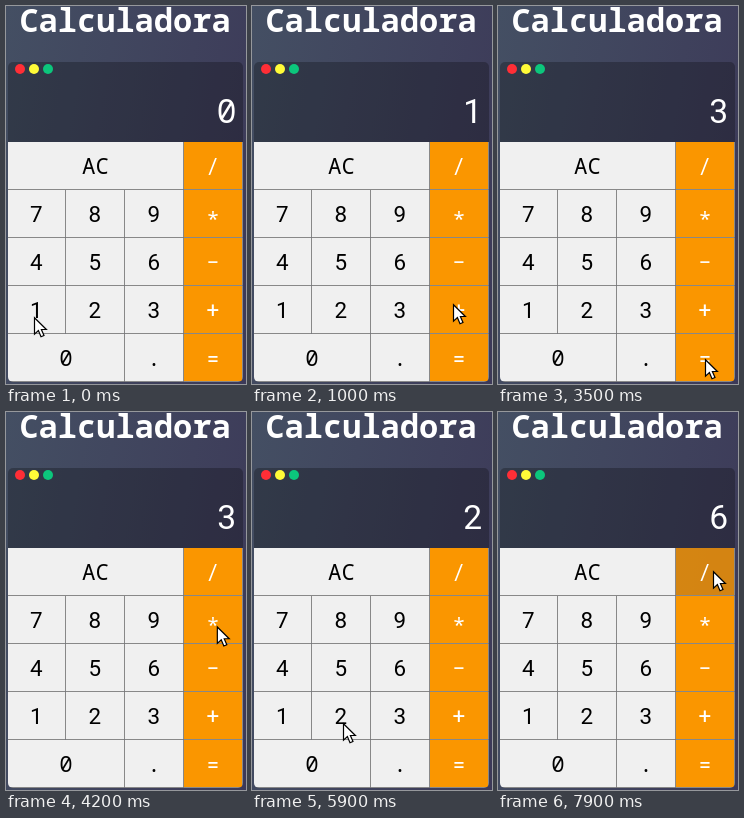
Recreate the animation shown at these times as an HTML page. Size 240x378 px, loop 8 s.

```html
<!DOCTYPE html>
<html lang="pt">
<head>
<meta charset="utf-8">
<style>
html, body { margin: 0; height: 100%; overflow: hidden; }
svg { display: block; width: 240px; height: 378px; background: linear-gradient(100deg, #444f63, #3c3958); }
text { text-anchor: middle; font-family: "Roboto Mono", Roboto, sans-serif; }
.mono { font-family: "Roboto Mono", "Noto Sans Mono", monospace; }
</style>
</head>
<body>
<svg viewBox="0 0 240 378">
  <defs><clipPath id="round"><rect x="2" y="56" width="235" height="320" rx="5"/></clipPath></defs>
  <text class="mono" x="119" y="26" font-size="32" font-weight="600" fill="#fff">Calculadora</text>
  <g clip-path="url(#round)">
    <rect x="2" y="56" width="235" height="80" fill="#0004"/>
    <g id="keys" font-size="22.4"></g>
  </g>
  <circle cx="14" cy="63" r="5" fill="#ff2e36"/>
  <circle cx="28" cy="63" r="5" fill="#fffb38"/>
  <circle cx="42" cy="63" r="5" fill="#0cc67c"/>
  <text id="display" x="220.7" y="117" font-size="33.6" fill="#fff"></text>
  <path id="cursor" d="M.5.8V17.2L4.4 13.6 7 19.8 10 18.5 7.4 12.5H12.4Z" fill="#fff" stroke="#000" stroke-width="1.2"/>
</svg>
<script>
const $ = id => document.getElementById(id);
const LOOP = 8000, STEP = 100, COL = 58.75, ROW = 48;
const rows = ['AAA/', '789*', '456−', '123+', '00.='];
const keys = {};

function add(tag, attrs, text = '') {
  const el = document.createElementNS('http://www.w3.org/2000/svg', tag);
  for (const name in attrs) el.setAttribute(name, attrs[name]);
  el.textContent = text;
  return $('keys').appendChild(el);
}

// A repeated letter is one wide key.
rows.forEach((row, r) => {
  for (const [run] of row.matchAll(/(.)\1*/g)) {
    const key = run[0], col = row.indexOf(key), op = col === 3;
    const x = Math.round(1.6 + col * COL), right = Math.round(1.6 + (col + run.length) * COL);
    const y = 136 + r * ROW, w = right - x;
    add('path', { d: `M${x} ${y + 47.5}H${right - .5}V${y}`, fill: 'none', stroke: '#888' });
    const face = add('rect', { x, y, width: w - 1, height: ROW - 1 });
    add('text', {
      x: x + w / 2 - .6, y: y + (key === '*' ? 38 : 32),
      fill: op ? '#fff' : '#000', class: /[A0.*]/.test(key) ? 'mono' : ''
    }, key === 'A' ? 'AC' : key);
    keys[key] = { face, up: op ? '#fa9600' : '#f0f0f0', down: op ? '#fa9600cc' : '#ccc' };
  }
});

// Pointer stops: arrival, departure, x, y, key released on departure, how long it looks pressed
const stops = [
  [0, 200, 28, 311, '1'],
  [1000, 1200, 201, 298, '+'],
  [1400, 1500, 92, 304, '2'],
  [1900, 1900, 215, 338],
  [2100, 2500, 207, 353, '=', 200],
  [3500, 3500, 207, 353],
  [4300, 4600, 211, 208, '*', 200],
  [5400, 5900, 91, 311, '2', 0],
  [6200, 6600, 208, 354, '=', 200],
  [6900, 6900, 208, 354],
  [7800, LOOP, 215, 159, '/']
];

const ops = { '+': (a, b) => a + b, '−': (a, b) => a - b, '*': (a, b) => a * b, '/': (a, b) => a / b };

function calculate(typed) {
  let shown = 0, total = 0, op;
  for (const key of typed) {
    if (/\d/.test(key)) { shown = +key; continue; }
    total = shown = op ? op(total, shown) : shown;
    op = ops[key];
  }
  return shown;
}

function pointerAt(t) {
  const next = stops.findIndex(([arrive]) => arrive > t);
  const [, leave, x, y] = stops.at(next < 0 ? -1 : next - 1);
  if (next < 0 || t <= leave) return [x, y];
  const [arrive, , x1, y1] = stops[next];
  const k = (t - leave) / (arrive - leave), ease = k * k * (3 - 2 * k);
  return [x + (x1 - x) * ease, y + (y1 - y) * ease];
}

function draw(now) {
  const t = Math.floor(now % LOOP / STEP) * STEP;
  $('cursor').setAttribute('transform', `translate(${pointerAt(t)})`);

  const clicks = stops.filter(s => s[4]);
  const held = clicks.find(([, up, , , , hold = 100]) => t >= up - hold && t < up);
  for (const key in keys) {
    const { face, up, down } = keys[key];
    face.setAttribute('fill', held && held[4] === key ? down : up);
  }
  const value = calculate(clicks.filter(s => s[1] <= t).map(s => s[4]));
  $('display').textContent = value;
  $('display').setAttribute('class', value ? '' : 'mono');
}

const start = performance.now();
(function tick() {
  draw(performance.now() - start);
  requestAnimationFrame(tick);
})();
</script>
</body>
</html>
```
